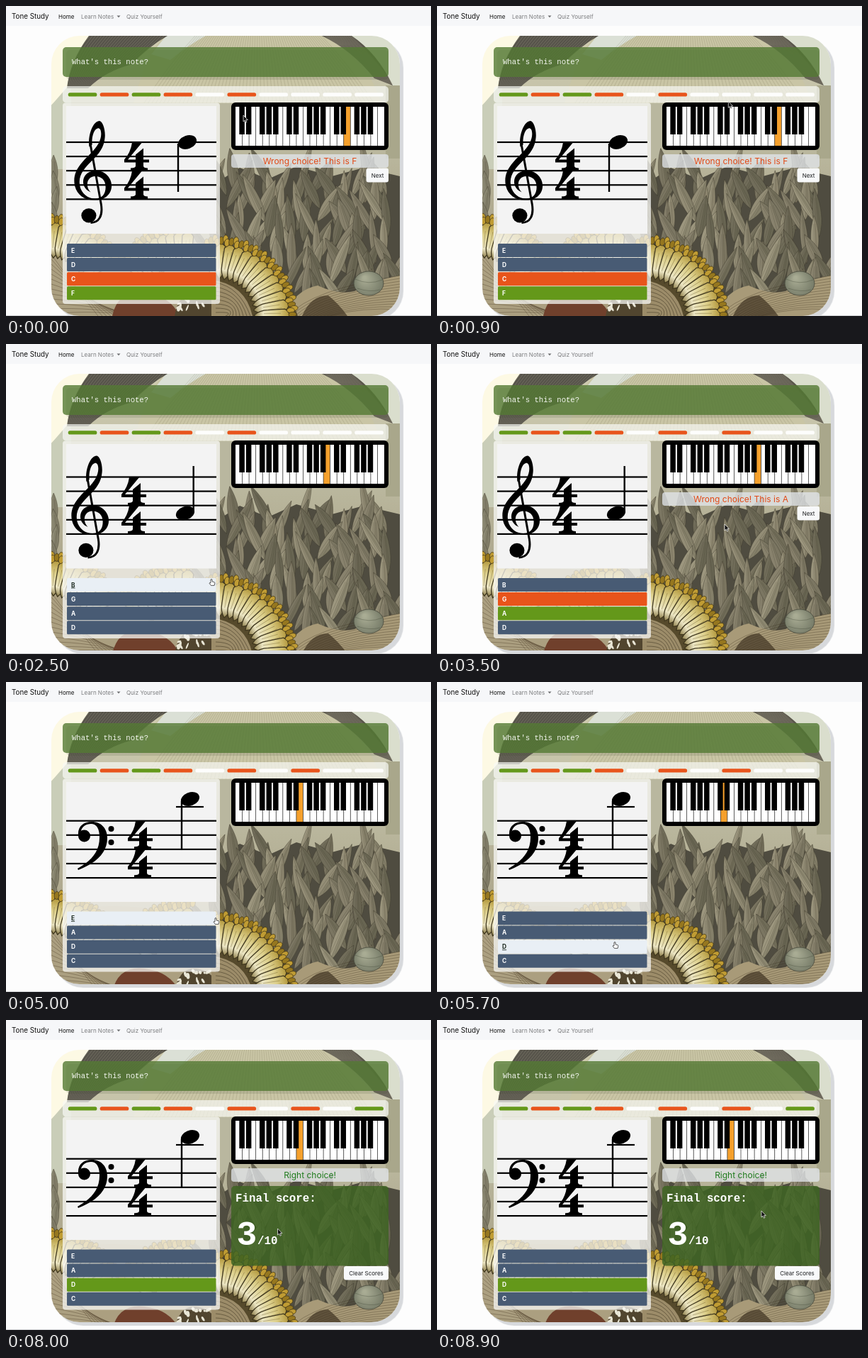
Recreate the animation shown at these times as an HTML page with a canvas. Size 600 px wide and 437 px high, loop 9 s.

```html
<!DOCTYPE html>
<html lang="en">
<head>
<meta charset="utf-8">
<title>Tone Study</title>
<style>
  html, body { margin: 0; width: 100%; height: 100%; overflow: hidden; background: #fdfdfd; }
  #stage { position: absolute; left: 0; top: 0; width: 600px; height: 437px; overflow: hidden; }
  #nav { position: absolute; width: 600px; height: 28px; background: #f6f7f9; }
  #edge { position: absolute; top: 436px; width: 600px; height: 1px; background: #cbccce; }
  #card { position: absolute; left: 64px; top: 42px; width: 492px; border-radius: 40px; overflow: hidden; box-shadow: 5px 5px 1px #d7d9dc; }
  #art { position: absolute; left: -64px; top: -42px; }
  svg { position: absolute; left: 0; top: 0; }
  text { font-family: Inter, Roboto, sans-serif; white-space: pre; }
  .mono { font-family: "Courier New", "Liberation Mono", monospace; }
</style>
</head>
<body>
<div id="stage">
  <div id="nav"></div>
  <div id="edge"></div>
  <div id="card"><canvas id="art" width="600" height="437"></canvas></div>
  <svg id="ui" width="600" height="437" viewBox="0 0 600 437"></svg>
</div>
<script>
const LOOP = 9000, STEP = 100;
const RED = '#e8541b', GREEN = '#64981a', BLUE = '#485b74', ORANGE = '#f5a02c';

const questions = [
  { top: 192, dx: 0, imgEnd: 321, rows: 335, names: 'EDCF', right: 3, wrong: 2, note: [256, 192, 243, 194, 262] },
  { top: 187.5, dx: -4, imgEnd: 316.5, rows: 330, names: 'BGAD', right: 2, wrong: 1, note: [253, 238.5, 264.7, 172, 238] },
  { top: 195.7, dx: 5, imgEnd: 310, rows: 323.5, names: 'EADC', right: 2, wrong: -1, bass: true, note: [260, 165, 248, 168, 236] }
];

// What changes, and when
const steps = [
  [0, { q: 0, done: true, key: 16, hover: -1, bar: -1, dark: false }],
  [1000, { bar: 7 }],
  [1400, { q: 1, done: false, key: -1 }],
  [1800, { bar: -1 }],
  [2500, { hover: 0, key: 13 }],
  [2700, { hover: 1, key: 11 }],
  [2900, { done: true }],
  [3100, { hover: 0, key: 13 }],
  [3300, { hover: -1 }],
  [4100, { bar: 9 }],
  [4400, { q: 2, done: false, key: -1 }],
  [4600, { bar: -1 }],
  [5000, { hover: 0, key: 9 }],
  [5300, { hover: 1, key: 12 }],
  [5500, { hover: 2, key: 8 }],
  [6300, { done: true, dark: true }],
  [6800, { hover: 1, key: 12 }],
  [7300, { hover: 0, key: 9, dark: false }],
  [7600, { hover: -1 }]
];

// Pointer path: time, x, y
const path = [
  [0, 335, 154], [500, 372, 150], [1100, 425, 129], [1700, 428, 129], [2000, 410, 165],
  [2500, 290, 332], [2700, 262, 355], [3000, 262, 355], [3200, 282, 338], [3500, 406, 254],
  [4100, 505, 128], [4500, 510, 125], [4700, 450, 195], [5000, 296, 333], [5300, 272, 350],
  [5700, 251, 367], [6300, 250, 368], [7100, 262, 349], [7400, 268, 332], [7700, 310, 318],
  [8300, 457, 270], [9000, 458, 269]
];

// ---------- background picture ----------
function paintArt() {
  const c = document.getElementById('art').getContext('2d');
  let seed = 11;
  const rnd = (a = 0, b = 1) => {
    seed = (seed * 16807) % 2147483647;
    return a + (b - a) * seed / 2147483647;
  };
  const fill = (d, color) => { c.fillStyle = color; c.fill(new Path2D(d)); };
  const line = (d, color, w = 0.6) => { c.strokeStyle = color; c.lineWidth = w; c.stroke(new Path2D(d)); };

  const sky = c.createLinearGradient(0, 42, 0, 320);
  sky.addColorStop(0, '#d0ccb0');
  sky.addColorStop(0.4, '#c0bfa6');
  sky.addColorStop(1, '#aca58a');
  c.fillStyle = sky;
  c.fillRect(0, 0, 600, 437);

  // petals and dome along the top
  fill('M64 42H140L80 125L64 140Z', '#fdf9e4');
  fill('M64 140L92 108V230H64Z', '#c9cdb8');
  fill('M556 42H480Q522 66 545 112L556 120Z', '#dadecd');
  fill('M226 42H455Q510 75 530 137H180Q200 60 226 42Z', '#c9c5a5');
  fill('M226 42H282Q256 56 232 76L205 68Z', '#dbe0d6');
  for (let i = 0; i < 60; i++) {
    const x = 195 + i * 5.5;
    line(`M${x} 137Q${355 + (x - 355) * 0.8} 85 ${355 + (x - 355) * 0.55} 42`, 'rgba(80,75,48,.25)', 0.6);
  }
  fill('M117 42H228Q200 58 178 82Q140 92 116 116H86Q90 78 117 42Z', '#57544b');
  fill('M446 42H488Q524 66 546 112L520 102Q488 62 446 42Z', '#5b574c');
  for (let i = 0; i < 26; i++) {
    const x = 118 + i * 4.2;
    line(`M${x} 42Q${x - 22} 66 ${86 + i * 2} 114`, 'rgba(200,195,170,.35)');
    line(`M${450 + i * 1.5} 42Q${488 + i} 66 ${522 + i} 110`, 'rgba(200,195,170,.3)');
  }
  fill('M300 137H322V215H300Z', '#b9b79f');
  fill('M536 112H556V215H536Z', '#a9a78b');

  function leaf(x, y, len, w, ang, color) {
    c.save();
    c.translate(x, y);
    c.rotate(ang);
    const d = `M0 0C${-w} ${-len * 0.3} ${-w * 0.7} ${-len * 0.7} 0 ${-len}C${w * 0.7} ${-len * 0.7} ${w} ${-len * 0.3} 0 0Z`;
    fill(d, color);
    line(d, 'rgba(52,48,36,.55)', 0.6);
    fill(`M0 0C${w} ${-len * 0.3} ${w * 0.7} ${-len * 0.7} 0 ${-len}Z`, 'rgba(60,55,40,.16)');
    line(`M0 0V${-len}M${-w * 0.3} ${-len * 0.15}L${-w * 0.15} ${-len * 0.8}M${w * 0.3} ${-len * 0.15}L${w * 0.15} ${-len * 0.8}`, 'rgba(60,55,40,.35)', 0.5);
    c.restore();
  }
  fill('M296 250L330 228L370 244L410 226L460 240L505 228L556 240V437H296Z', '#4f4c40');
  const tones = ['#7b7662', '#88826d', '#938d76', '#716d5a', '#9c967e'];
  for (let y = 268; y < 425; y += 22) {
    for (let x = 292; x < 570; x += 19) {
      leaf(x + rnd(-7, 7), y + rnd(-10, 10), rnd(48, 78), rnd(8, 13), rnd(-0.6, 0.6), tones[Math.floor(rnd(0, 5))]);
    }
  }
  for (let y = 255; y < 330; y += 22) leaf(68 + rnd(-4, 8), y, 45, 9, rnd(-0.4, 0.4), '#8f8c76');

  // roots and soil
  fill('M64 325Q190 300 300 345L320 437H64Z', '#ab9f80');
  fill('M392 437Q408 400 440 394Q470 408 492 402Q525 385 556 380V437Z', '#a89a78');
  fill('M418 437Q430 408 455 408Q470 420 482 437Z', '#5f523c');
  for (let i = 0; i < 13; i++) {
    line(`M${398 + i * 5} 437Q${430 + i * 6} ${400 + i * 2} 556 ${380 + i * 4}`, 'rgba(60,48,30,.55)');
    line(`M64 ${350 + i * 7}Q${85 + i * 3} ${380 + i * 4} ${130 + i * 6} 437`, 'rgba(70,55,35,.6)');
  }
  fill('M150 437Q158 400 195 404T245 437Z', '#70402c');
  fill('M238 437Q244 402 268 404T306 437Z', '#51452f');
  for (let i = 0; i < 16; i++) {
    c.fillStyle = '#e9e6d6';
    c.beginPath();
    c.ellipse(rnd(242, 292), rnd(406, 430), rnd(1.5, 5), rnd(1, 3), rnd(0, 3), 0, 7);
    c.fill();
  }

  function fan(cx, cy, r, from, to, count) {
    for (let i = 0; i < count; i++) {
      c.save();
      c.translate(cx, cy);
      c.rotate(from + (to - from) * i / (count - 1));
      const cob = `M${r - 58} 0Q${r - 50} -7 ${r - 38} -7L${r - 14} -8Q${r - 2} 0 ${r - 14} 8L${r - 38} 7Q${r - 50} 7 ${r - 58} 0Z`;
      const skin = c.createLinearGradient(r - 58, 0, r - 4, 0);
      skin.addColorStop(0, '#8a7a45');
      skin.addColorStop(0.25, '#ece6c4');
      skin.addColorStop(0.6, '#ddd08c');
      skin.addColorStop(1, '#a98b2a');
      fill(cob, skin);
      line(cob, '#40381f', 1.3);
      line(`M${r - 44} -2H${r - 20}M${r - 40} 3H${r - 18}`, 'rgba(90,72,25,.55)');
      for (let k = 0; k < 3; k++) {
        c.fillStyle = k % 2 ? '#96771f' : '#c09c33';
        c.beginPath();
        c.ellipse(r - 6 + k * 2.5, (k - 1) * 6, 5.5, 3.6, 0, 0, 7);
        c.fill();
        c.strokeStyle = '#4c3f1b';
        c.lineWidth = 0.8;
        c.stroke();
      }
      c.restore();
    }
  }
  fill('M290 437V336Q380 340 412 437Z', '#564a2c');
  fan(298, 437, 110, -1.65, -0.02, 13);
  fill('M290 437V386Q338 392 348 437Z', '#9c8c69');
  for (let i = 0; i < 8; i++) line(`M296 ${390 + i * 6}Q${330 - i} ${396 + i * 5} ${345 - i * 5} 437`, 'rgba(50,40,25,.6)', 0.8);
  fan(62, 405, 108, -1.6, -0.5, 10);
  fan(250, 420, 110, -2.5, -1.5, 9);

  const ball = c.createRadialGradient(506, 383, 2, 512, 391, 22);
  ball.addColorStop(0, '#a9ac94');
  ball.addColorStop(1, '#747966');
  c.fillStyle = ball;
  c.beginPath();
  c.ellipse(512, 391, 21, 17, 0, 0, 7);
  c.fill();
  c.strokeStyle = '#47483b';
  c.lineWidth = 0.8;
  c.stroke();
  line('M493 385Q512 394 531 386M496 398Q513 404 528 400', 'rgba(55,60,45,.5)');
}

// ---------- interface ----------
const ui = document.getElementById('ui');
function add(tag, attrs, parent = ui) {
  const e = document.createElementNS('http://www.w3.org/2000/svg', tag);
  for (const k in attrs) e.setAttribute(k, attrs[k]);
  return parent.appendChild(e);
}
const box = (x, y, x2, y2, fill, rx = 0, parent = ui) =>
  add('rect', { x, y, width: x2 - x, height: y2 - y, fill, rx }, parent);
function label(s, x, y, size, fill, more = {}, parent = ui) {
  const e = add('text', { x, y, 'font-size': size, fill, ...more }, parent);
  e.textContent = s;
  return e;
}

label('Tone Study', 8, 18, 9.8, '#111');
label('Home', 74, 17.5, 8, '#111');
label('Learn Notes', 106, 17.5, 8, '#7b7c7e');
add('path', { d: 'M156.5 13.5h5l-2.5 2.8z', fill: '#6d6e70' });
label('Quiz Yourself', 170, 17.5, 8, '#7b7c7e');

box(85, 62, 540, 104, 'rgba(60,70,45,.14)', 5);
box(80, 58, 540, 100, 'rgba(84,122,52,.8)', 5);
label("What's this note?", 93, 82, 10.6, '#f4f7f0', { class: 'mono' });
box(80, 113, 540, 136.5, 'rgba(248,249,245,.7)', 5);

const bars = Array.from({ length: 10 }, (_, i) => box(87.7 + i * 44.95, 122.3, 128.4 + i * 44.95, 127.5, '#fff', 2.6));

const KEY = 210 / 22;
box(318, 136, 540, 203, '#000', 6);
const whites = [];
for (let i = 0; i < 22; i++) whites.push(box(324 + i * KEY, 142, 324 + (i + 1) * KEY, 197, '#fff'));
for (let i = 1; i < 22; i++) {
  const x = 324 + i * KEY;
  box(x - 0.4, 142, x + 0.4, 197, '#444');
  if (![0, 3].includes(i % 7)) box(x - 4.2, 142, x + 3.3, 181, '#000');
}

const scene = add('g', {});
const GAP = 20.1;
const TREBLE = 'M125 273C108 274 97 262 97 246C97 228 112 216 119 208C128 199 133 190 133 181C133 175 131 173 129 173C123 174 120 186 121 196L117 199C115 183 122 163 131 163C135 164 139 175 138 186C137 200 130 208 122 217C112 227 104 236 104 248C104 261 113 271 125 271Z' +
  'M119 262C104 256 106 234 124 232C138 231 147 242 147 253C147 265 138 273 125 273L125 271C134 271 139 265 139 255C139 245 133 240 125 240C114 240 111 254 119 262Z';
const BASS = 'M102 216C101 203 110 197 121 197C135 197 143 207 143 220C143 240 128 255 102 265L101 263C120 252 132 240 132 219C132 207 128 200 120 200C113 200 107 204 106 210Z';
const FOUR = 'M11 0H25L5 24H16V17L27 8V24H35V28H27V33Q27 36 33 36V40H9V36Q16 36 16 33V28H0V24Q9 14 11 0Z';

function drawStaff(q) {
  for (let i = 0; i < 5; i++) box(85, q.top + i * GAP - 1.1, 297, q.top + i * GAP + 1.1, '#000', 0, scene);
  if (q.bass) {
    add('path', { d: BASS }, scene);
    add('circle', { cx: 110.5, cy: 217, r: 8.5 }, scene);
    for (const cy of [207, 226]) add('circle', { cx: 148.5, cy, r: 4 }, scene);
    box(240, 174.9, 279, 177.1, '#000', 0, scene);
  } else {
    const g = add('g', { transform: `translate(${q.dx - 6} ${q.top - 195}) scale(1.055 1.013)` }, scene);
    add('path', { d: TREBLE }, g);
    add('path', { d: 'M118.7 196L133 279C135.5 295 130 304.5 119 304.5', fill: 'none', stroke: '#000', 'stroke-width': 2.8 }, g);
    add('circle', { cx: 116.5, cy: 294.5, r: 10 }, g);
  }
  for (const dy of [0.5, 40.5]) add('path', { d: FOUR, transform: `translate(${167 + q.dx} ${q.top + dy})` }, scene);
  const [x, y, stem, y1, y2] = q.note;
  add('ellipse', { cx: x, cy: y, rx: 13.5, ry: 9.3, transform: `rotate(-20 ${x} ${y})` }, scene);
  box(stem - 1.2, y1, stem + 1.2, y2, '#000', 0, scene);
}

function drawAnswers(q, s) {
  [...q.names].forEach((name, i) => {
    const y = q.rows + i * 20.1;
    const lit = !s.done && s.hover === i;
    const right = s.done && i === q.right;
    const color = lit ? '#e9eff5' : right ? GREEN : s.done && i === q.wrong ? RED : BLUE;
    box(86, y, 296.5, y + 19, color, 1.5, scene);
    const ink = lit || (right && s.dark) ? '#1d2a20' : '#fff';
    label(name, 92, y + 12.6, 8.4, ink, { 'font-weight': 700, 'text-decoration': lit ? 'underline' : 'none' }, scene);
  });
}

function drawResult(q, s) {
  const won = q.wrong < 0;
  box(318, 209, 540, 228, 'rgba(226,231,235,.76)', 4, scene);
  label(won ? 'Right choice!' : 'Wrong choice! This is ' + q.names[q.right], 429, 223, 12,
    won ? '#1f7a1c' : '#e24a17', { 'text-anchor': 'middle' }, scene);
  if (!won) {
    box(508.5, 228.5, 540, 248.5, '#f7f8f9', 3, scene);
    label('Next', 524.5, 241.5, 8, '#181a1c', { 'text-anchor': 'middle' }, scene);
    return;
  }
  const bold = { class: 'mono', 'font-weight': 700 };
  box(318, 234, 540, 346.5, 'rgba(62,100,34,.83)', 5, scene);
  label('Final score:', 324, 256, 15.8, '#fff', bold, scene);
  label('3', 325.5, 317, 48, '#fff', bold, scene);
  label('/10', 355, 316, 15.8, '#fff', bold, scene);
  box(477, 347, 540, 366.5, '#f8f9fa', 3, scene);
  label('Clear Scores', 508.5, 359.8, 8, '#181a1c', { 'text-anchor': 'middle' }, scene);
}

function barColor(i, s) {
  if (i === s.bar) return '#17191b';
  if (i === 0 || i === 2) return GREEN;
  if (i === 1 || i === 3 || i === 5) return RED;
  if (i === 7 && (s.q > 1 || (s.q === 1 && s.done))) return RED;
  if (i === 9 && s.q === 2 && s.done) return GREEN;
  return '#fdfdfc';
}

const card = document.getElementById('card');
function draw(s) {
  const q = questions[s.q];
  const end = q.rows + 85;
  card.style.height = end + 17 - 42 + 'px';
  scene.replaceChildren();
  box(80, 136.5, 302, end, 'rgba(248,249,246,.74)', 4, scene);
  box(85, 141, 297, q.imgEnd, '#f3f3f3', 0, scene);
  drawStaff(q);
  drawAnswers(q, s);
  if (s.done) drawResult(q, s);
  bars.forEach((b, i) => b.setAttribute('fill', barColor(i, s)));
  whites.forEach((w, i) => w.setAttribute('fill', i === s.key ? ORANGE : '#fff'));
}

const arrow = add('path', { d: 'M0 0V9L2.1 7.2L3.5 10.2L5 9.5L3.7 6.6H6.4Z', fill: '#111', stroke: '#fff', 'stroke-width': 0.7 });
const hand = add('path', { d: 'M-1 0Q0 -1 1 0V3L4 3.7Q5 4 4.8 5.2L4.1 8.4H-.6L-3 5.2Q-3 4 -1 5Z', fill: '#fff', stroke: '#333', 'stroke-width': 0.8 });

function pointAt(t) {
  const i = Math.max(1, path.findIndex(p => p[0] > t));
  const [a, b] = [path[i - 1], path[i]];
  const u = (t - a[0]) / (b[0] - a[0]);
  const k = u * u * (3 - 2 * u);
  return [a[1] + (b[1] - a[1]) * k, a[2] + (b[2] - a[2]) * k];
}

let shown = -1;
function frame(now) {
  const t = Math.floor((now % LOOP) / STEP) * STEP;
  const active = steps.filter(p => p[0] <= t);
  const s = Object.assign({}, ...active.map(p => p[1]));
  if (active.length !== shown) {
    shown = active.length;
    draw(s);
  }
  const [x, y] = pointAt(t);
  const over = s.bar >= 0 || s.hover >= 0;
  for (const [el, on] of [[arrow, !over], [hand, over]]) {
    el.setAttribute('transform', `translate(${x} ${y})`);
    el.setAttribute('visibility', on ? 'visible' : 'hidden');
  }
}

paintArt();
const start = performance.now();
frame(0);
(function tick() {
  frame(Math.max(0, performance.now() - start));
  requestAnimationFrame(tick);
})();
</script>
</body>
</html>
```
